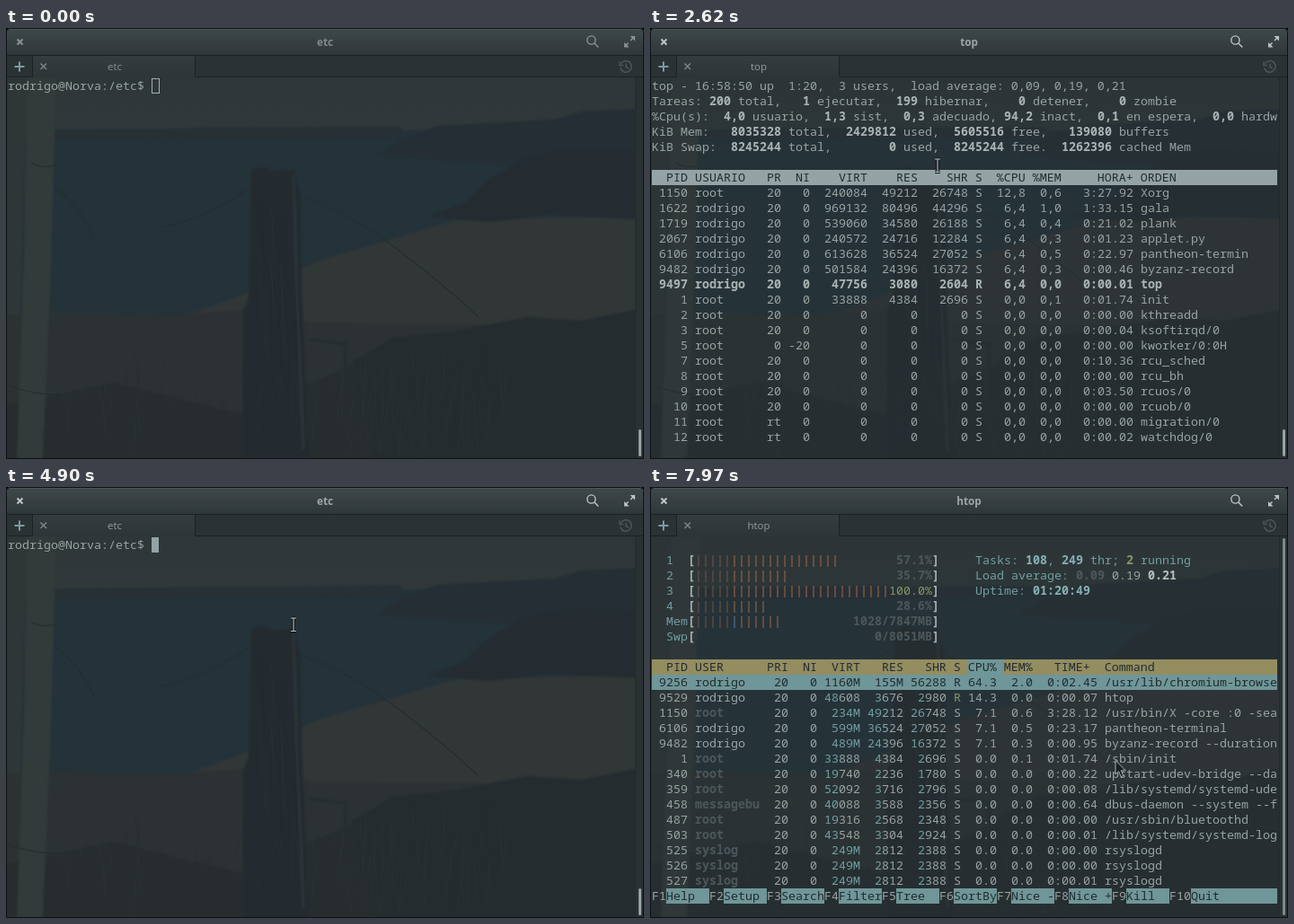
These frames come from a looping animation (710x480 px, 8000 ms). An HTML page with a canvas:

```html
<!DOCTYPE html>
<html lang="es">
<head>
<meta charset="utf-8">
<title>Terminal</title>
<style>
html, body { margin: 0; width: 100%; height: 100%; overflow: hidden; background: #000; }
canvas { display: block; width: 710px; height: 480px; }
</style>
</head>
<body>
<canvas id="stage" width="710" height="480"></canvas>
<script>
const W = 710, H = 480, LOOP = 8000;
const CW = 8, LH = 17, LEFT = 2, TOP = 56, LAST = 23;
const PROMPT = 'rodrigo@Norva:/etc$ ', USER = 'rodrigo';
const FG = '#98a3a2', BRIGHT = '#a9b4b4', DIM = '#4c575a', TEAL = '#6f9fa3',
      GREEN = '#87976a', DARK = '#222c30', OLIVE = '#938d60', CYAN = '#6f9698',
      BROWN = '#76584a', ORANGE = '#a26c49';
const MONO = '13.333px "Noto Sans Mono", "DejaVu Sans Mono", monospace';
const c = document.getElementById('stage').getContext('2d');

// time, screen, typed text, cursor, title
const steps = [
  [0, 'shell', '', 'box', 'etc'],
  [810, 'shell', '', 'block', 'etc'],
  [1340, 'shell', '', '', 'etc'],
  [1680, 'shell', 't', 'block', 'etc'],
  [1840, 'shell', 'to', 'block', 'etc'],
  [1930, 'shell', 'top', 'block', 'etc'],
  [2380, 'shell', 'top', '', 'etc'],
  [2420, 'shell', 'top', '', 'top'],
  [2620, 'top', '', '', 'top'],
  [3380, 'done', '', 'block', 'top'],
  [3420, 'done', '', 'block', 'etc: top'],
  [3950, 'done', '', '', 'etc: top'],
  [4160, 'done', 'c', 'block', 'etc: top'],
  [4265, 'done', 'cl', 'block', 'etc: top'],
  [4370, 'done', 'cle', 'block', 'etc: top'],
  [4570, 'done', 'clea', 'block', 'etc: top'],
  [4680, 'done', 'clear', 'block', 'etc: top'],
  [4900, 'shell', '', 'block', 'etc'],
  [5430, 'shell', '', '', 'etc'],
  [5590, 'shell', 'h', 'block', 'etc'],
  [5740, 'shell', 'ht', 'block', 'etc'],
  [5900, 'shell', 'hto', 'block', 'etc'],
  [6040, 'shell', 'htop', 'block', 'etc'],
  [6360, 'shell', 'htop', '', 'etc'],
  [6440, 'shell', 'htop', '', 'htop'],
  [6520, 'htop', '', '', 'htop']
];

// asterisks switch bold on and off
const topHead = [
  'top - 16:58:50 up  1:20,  3 users,  load average: 0,09, 0,19, 0,21',
  'Tareas: *200* total,   *1* ejecutar,  *199* hibernar,    *0* detener,    *0* zombie',
  '%Cpu(s):  *4,0* usuario,  *1,3* sist,  *0,3* adecuado, *94,2* inact,  *0,1* en espera,  *0,0* hardw',
  'KiB Mem:   *8035328* total,  *2429812* used,  *5605516* free,   *139080* buffers',
  'KiB Swap:  *8245244* total,        *0* used,  *8245244* free.  *1262396* cached Mem'
];
const topCols = '  PID USUARIO   PR  NI    VIRT    RES    SHR S  %CPU %MEM     HORA+ ORDEN';
const topRows = `1150 root 20 0 240084 49212 26748 S 12,8 0,6 3:27.92 Xorg
1622 @ 20 0 969132 80496 44296 S 6,4 1,0 1:33.15 gala
1719 @ 20 0 539060 34580 26188 S 6,4 0,4 0:21.02 plank
2067 @ 20 0 240572 24716 12284 S 6,4 0,3 0:01.23 applet.py
6106 @ 20 0 613628 36524 27052 S 6,4 0,5 0:22.97 pantheon-termin
9482 @ 20 0 501584 24396 16372 S 6,4 0,3 0:00.46 byzanz-record
9497 @ 20 0 47756 3080 2604 R 6,4 0,0 0:00.01 top
1 root 20 0 33888 4384 2696 S 0,0 0,1 0:01.74 init
2 root 20 0 0 0 0 S 0,0 0,0 0:00.00 kthreadd
3 root 20 0 0 0 0 S 0,0 0,0 0:00.04 ksoftirqd/0
5 root 0 -20 0 0 0 S 0,0 0,0 0:00.00 kworker/0:0H
7 root 20 0 0 0 0 S 0,0 0,0 0:10.36 rcu_sched
8 root 20 0 0 0 0 S 0,0 0,0 0:00.00 rcu_bh
9 root 20 0 0 0 0 S 0,0 0,0 0:03.50 rcuos/0
10 root 20 0 0 0 0 S 0,0 0,0 0:00.00 rcuob/0
11 root rt 0 0 0 0 S 0,0 0,0 0:00.00 migration/0
12 root rt 0 0 0 0 S 0,0 0,0 0:00.02 watchdog/0`.split('\n');
const topEnds = [5, 0, 18, 22, 30, 37, 44, 46, 52, 57, 67];

const htopCols = '  PID USER      PRI  NI  VIRT   RES   SHR S CPU% MEM%   TIME+  Command';
const htopRows = `9256 @ 20 0 1160M 155M 56288 R 64.3 2.0 0:02.45 /usr/lib/chromium-browse
9529 @ 20 0 48608 3676 2980 R 14.3 0.0 0:00.07 htop
1150 root 20 0 234M 49212 26748 S 7.1 0.6 3:28.12 /usr/bin/X -core :0 -sea
6106 @ 20 0 599M 36524 27052 S 7.1 0.5 0:23.17 pantheon-terminal
9482 @ 20 0 489M 24396 16372 S 7.1 0.3 0:00.95 byzanz-record --duration
1 root 20 0 33888 4384 2696 S 0.0 0.1 0:01.74 /sbin/init
340 root 20 0 19740 2236 1780 S 0.0 0.0 0:00.22 upstart-udev-bridge --da
359 root 20 0 52092 3716 2796 S 0.0 0.0 0:00.08 /lib/systemd/systemd-ude
458 messagebu 20 0 40088 3588 2356 S 0.0 0.0 0:00.64 dbus-daemon --system --f
487 root 20 0 19316 2568 2348 S 0.0 0.0 0:00.00 /usr/sbin/bluetoothd
503 root 20 0 43548 3304 2924 S 0.0 0.0 0:00.01 /lib/systemd/systemd-log
525 syslog 20 0 249M 2812 2388 S 0.0 0.0 0:00.00 rsyslogd
526 syslog 20 0 249M 2812 2388 S 0.0 0.0 0:00.00 rsyslogd
527 syslog 20 0 249M 2812 2388 S 0.0 0.0 0:00.01 rsyslogd`.split('\n');
const htopEnds = [5, 0, 19, 23, 29, 35, 41, 43, 48, 53, 62];

function put(row, col, text, color = FG, bold = false) {
  c.font = (bold ? 'bold ' : '') + MONO;
  c.fillStyle = color;
  c.fillText(text, LEFT + col * CW, TOP + row * LH + 13);
}
function band(row, col, cols, color) {
  c.fillStyle = color;
  c.fillRect(LEFT + col * CW, TOP + row * LH, cols * CW, LH);
}
function rich(row, col, text, color = FG, boldColor = BRIGHT) {
  text.split('*').forEach((part, i) => {
    put(row, col, part, i % 2 ? boldColor : color, i % 2 === 1);
    col += part.length;
  });
}
function poly(g, color, pts) {
  g.beginPath();
  for (let i = 0; i < pts.length; i += 2) g.lineTo(pts[i], pts[i + 1]);
  g.closePath();
  g.fillStyle = color;
  g.fill();
}
function line(g, color, width, path) {
  g.strokeStyle = color;
  g.lineWidth = width;
  g.stroke(new Path2D(path));
}
function fade(g, y0, y1, a, b) {
  const f = g.createLinearGradient(0, y0, 0, y1);
  f.addColorStop(0, a);
  f.addColorStop(1, b);
  return f;
}

// dim coastal landscape behind the text
function makeScene() {
  const cv = document.createElement('canvas');
  cv.width = W;
  cv.height = H;
  const g = cv.getContext('2d');
  let seed = 7;
  const rnd = () => (seed = seed * 16807 % 2147483647) / 2147483647;
  g.fillStyle = fade(g, 55, 115, '#2e3637', '#303839');
  g.fillRect(0, 0, W, H);
  g.filter = 'blur(1px)';
  g.fillStyle = fade(g, 112, 320, '#24323a', '#24333a');
  g.fillRect(0, 114, W, 210);
  poly(g, '#263035', [50, 114, 250, 111, 440, 110, 440, 122, 200, 124, 50, 125]);
  poly(g, '#252e34', [412, 142, 440, 124, 480, 109, 612, 102, 640, 93, 710, 90, 710, 150, 560, 152]);
  poly(g, '#313637', [205, 318, 250, 302, 350, 258, 500, 214, 710, 208, 710, 340, 205, 340]);
  poly(g, '#242c32', [470, 210, 510, 195, 535, 170, 575, 146, 620, 136, 710, 138, 710, 213, 600, 208, 540, 216]);
  poly(g, '#2c3233', [0, 314, 90, 318, 180, 320, 270, 314, 340, 328, 440, 330, 710, 330, 710, 480, 0, 480]);
  poly(g, '#272d2f', [0, 420, 120, 395, 260, 430, 420, 360, 420, 480, 0, 480]);
  poly(g, '#252c2f', [385, 372, 430, 345, 500, 338, 580, 322, 640, 326, 710, 312, 710, 480, 410, 480]);
  poly(g, '#2e3637', [0, 55, 24, 55, 16, 320, 0, 320]);
  poly(g, '#323a3a', [23, 55, 56, 55, 50, 270, 41, 480, 12, 480, 20, 250]);
  poly(g, '#242b30', [273, 158, 288, 155, 300, 160, 320, 158, 328, 188, 329, 290, 338, 480, 264, 480, 264, 316, 270, 300]);
  line(g, '#2d3537', 3, 'M320 164L324 300L331 470');
  line(g, '#252d30', 3, 'M338 347L378 352L377 390');
  g.filter = 'none';
  line(g, '#252d31', 1.3, 'M330 188Q380 204 435 246T526 322 M54 177Q84 200 98 234 M272 178Q225 210 174 222 M28 150Q42 158 56 152 M2 398Q45 414 90 405 M264 211L272 207');
  for (let i = 0; i < 120; i++) {
    const x = 45 + rnd() * 510, y = 400 + rnd() * 80, h = 12 + rnd() * 55, d = rnd() * 20 - 10;
    g.globalAlpha = 0.45;
    line(g, i % 3 ? '#31383a' : '#252c2f', 0.8, `M${x} ${y}Q${x + d / 3} ${y - h / 2} ${x + d} ${y - h}`);
  }
  for (let i = 0; i < 18; i++) {
    const x = 276 + rnd() * 52, y = 180 + rnd() * 180;
    line(g, i % 2 ? '#2d3538' : '#20282d', 1, `M${x} ${y}l3 ${40 + rnd() * 70}`);
  }
  return cv;
}
const scene = makeScene();

function drawChrome(title, focus) {
  const tone = (a, b) => {
    const v = Math.round(a + (b - a) * focus);
    return `rgb(${v},${v + 6},${v + 7})`;
  };
  c.fillStyle = fade(c, 0, 30, '#3f484a', '#2f3739');
  c.fillRect(0, 0, W, 30);
  c.fillStyle = '#4d5658';
  c.fillRect(4, 1, W - 8, 1);
  c.fillStyle = '#2b3234';
  c.fillRect(0, 30, W, 25);
  c.fillStyle = fade(c, 31, 55, '#343c3e', '#2d3537');
  c.fillRect(30, 31, 181, 24);
  c.fillStyle = '#1c2224';
  c.fillRect(0, 30, W, 1);
  c.fillRect(0, 54, 30, 1);
  c.fillRect(211, 54, W - 211, 1);
  c.fillRect(29, 31, 1, 23);
  c.fillRect(210, 31, 1, 23);

  c.textAlign = 'center';
  c.font = 'bold 11.7px "Open Sans", "Noto Sans", sans-serif';
  c.fillStyle = tone(132, 160);
  c.fillText(title, 355, 20);
  c.font = '11.5px "Open Sans", "Noto Sans", sans-serif';
  c.fillStyle = tone(138, 150);
  c.fillText(title, 121, 47);
  c.textAlign = 'left';

  const icon = tone(140, 190);
  line(c, icon, 2, 'M12.5 12.5l6 6m0 -6l-6 6');
  line(c, icon, 1.4, 'M656 13.5a4.6 4.6 0 1 1 -9.2 0a4.6 4.6 0 1 1 9.2 0M654.8 17l4.5 4.5');
  line(c, icon, 1.5, 'M695 14l4 -4M692.500 16.500l-4 4');
  poly(c, icon, [694.5, 9, 700, 9, 700, 14.5]);
  poly(c, icon, [688, 16, 688, 21.5, 693.5, 21.5]);
  line(c, '#7d9aa0', 2, 'M9.500 43h11M15 37.500v11');
  line(c, '#7f898b', 1.4, 'M38.500 39.500l6.500 6.500m0 -6.500l-6.500 6.500');
  line(c, '#4b5557', 1.5, 'M684.500 39.500a6.300 6.300 0 1 1 -0.800 5M683 37.500v4h4M690 39.500v4l3 1.500');
}

function drawFrame(full) {
  c.fillStyle = '#2a3133';
  c.fillRect(701, 55, 8, 424);
  c.fillStyle = '#232a2c';
  c.fillRect(700, 55, 1, 424);
  c.fillStyle = full ? '#7d898a' : '#98a4a4';
  c.beginPath();
  c.roundRect(704, full ? 57 : 447, 3, full ? 420 : 30, 1.5);
  c.fill();
  c.strokeStyle = '#0d1112';
  c.lineWidth = 1;
  c.beginPath();
  c.roundRect(0.5, 0.5, W - 1, H - 1, [4, 4, 0, 0]);
  c.stroke();
}

function drawPrompt(row, typed, cursor) {
  put(row, 0, PROMPT + typed);
  const x = LEFT + (PROMPT.length + typed.length) * CW, y = TOP + row * LH;
  if (cursor === 'block') band(row, PROMPT.length + typed.length, 1, '#94a3a5');
  if (cursor === 'box') {
    c.strokeStyle = '#a4b0b1';
    c.lineWidth = 1;
    c.strokeRect(x + 0.5, y + 0.5, CW, LH - 1);
  }
}

function cells(text) {
  const parts = text.replace('@', USER).split(' ');
  return [...parts.slice(0, 11), parts.slice(11).join(' ')];
}

function drawTop(shift) {
  topHead.forEach((text, i) => { if (i >= shift) rich(i - shift, 0, text); });
  band(6 - shift, 0, 87, '#94a3a5');
  put(6 - shift, 0, topCols, DARK);
  topRows.forEach((text, i) => {
    const row = 7 + i - shift, bold = i === 6, color = bold ? BRIGHT : FG;
    cells(text).forEach((v, k) => {
      const col = k === 1 ? 6 : k === 11 ? 68 : topEnds[k] - v.length;
      put(row, col, v, color, bold);
    });
  });
}

function drawMeter(row, label, bars, value, blue) {
  put(row, 2, label, TEAL);
  put(row, 5, '[', BRIGHT, true);
  for (let i = 0; i < bars; i++) {
    put(row, 6 + i, '|', i === blue ? '#5b83ad' : i < 5 ? BROWN : ORANGE);
  }
  const whole = value === '100.0%';
  put(row, 39 - value.length, value, whole ? GREEN : DIM, !whole);
  put(row, 39, ']', BRIGHT, true);
}

function drawSize(row, end, v) {
  const col = end - v.length, cut = v.endsWith('M') ? v.length : Math.max(0, v.length - 3);
  put(row, col, v.slice(0, cut), TEAL);
  put(row, col + cut, v.slice(cut));
}

function drawHtop() {
  drawMeter(1, '1', 20, '57.1%');
  drawMeter(2, '2', 13, '35.7%');
  drawMeter(3, '3', 27, '100.0%');
  drawMeter(4, '4', 10, '28.6%');
  drawMeter(5, 'Mem', 12, '1028/7847MB', 5);
  drawMeter(6, 'Swp', 0, '0/8051MB');
  rich(1, 45, 'Tasks: *108*, *249* thr; ', TEAL, '#86b0b3');
  put(1, 66, '2', GREEN, true);
  put(1, 68, 'running', TEAL);
  put(2, 45, 'Load average:', TEAL);
  put(2, 59, '0.09', DIM, true);
  put(2, 64, '0.19');
  put(2, 69, '0.21', '#b5bfbf', true);
  rich(3, 45, 'Uptime: *01:20:49*', TEAL, '#86b0b3');

  band(8, 0, 87, OLIVE);
  band(8, 44, 5, CYAN);
  put(8, 0, htopCols, DARK);
  htopRows.forEach((text, i) => {
    const row = 9 + i, picked = i === 0;
    if (picked) band(row, 0, 87, CYAN);
    cells(text).forEach((v, k) => {
      const col = k === 1 ? 6 : k === 11 ? 63 : htopEnds[k] - v.length;
      if (picked) put(row, col, v, DARK);
      else if (k >= 4 && k <= 6) drawSize(row, htopEnds[k], v);
      else if (k === 1 && v !== USER) put(row, col, v, DIM, true);
      else put(row, col, v, k === 7 && v === 'R' ? GREEN : FG);
    });
  });
  'Help,Setup,Search,Filter,Tree,SortBy,Nice -,Nice +,Kill,Quit'.split(',').forEach((name, i) => {
    const key = 'F' + (i + 1), col = i * 8 + key.length;
    put(LAST, i * 8, key);
    band(LAST, col, i === 9 ? 87 - col : 6, CYAN);
    put(LAST, col, name, DARK);
  });
}

function drawBeam(x, y) {
  const path = `M${x - 3} ${y - 7}h2.500l.5 .5l.5 -.5h2.500M${x} ${y - 6.5}v14M${x - 3} ${y + 7.5}h6`;
  line(c, '#0c1011', 3.2, path);
  line(c, '#c3caca', 1.1, path);
}
function drawArrow(x, y) {
  const path = new Path2D(`M${x} ${y}v15.500l3.600 -3.200l2.600 5.900l2.700 -1.200l-2.600 -5.700h5z`);
  c.fillStyle = '#1b2022';
  c.fill(path);
  c.strokeStyle = '#a9b2b3';
  c.lineWidth = 1;
  c.stroke(path);
}

const smooth = p => p * p * (3 - 2 * p);
// pointer positions are sampled every 40 ms
const travel = (t, start, count) =>
  smooth(Math.max(0, Math.min(1, (Math.floor((t - start) / 40) + 1) / count)));

function drawPointer(t) {
  if (t < 440) return;
  if (t < 6600) {
    const e = smooth(Math.min(1, Math.floor((t - 440) / 40) / 3));
    drawBeam(Math.round(642 - 322 * e) , Math.round(156 - 3 * e));
  } else {
    const e = travel(t, 7410, 15);
    drawArrow(318 + 200 * e, 152.5 + 152 * e);
  }
}

function draw(t) {
  const [, screen, typed, cursor, title] = steps.filter(s => s[0] <= t).pop();
  const focus = t < 810 ? 0 : t < 860 ? 1 / 3 : t < 910 ? 2 / 3 : 1;
  c.clearRect(0, 0, W, H);
  c.save();
  c.beginPath();
  c.roundRect(0, 0, W, H, [5, 5, 0, 0]);
  c.clip();
  c.drawImage(scene, 0, 0);
  if (screen !== 'shell') {
    c.fillStyle = 'rgba(42,51,54,.35)';
    c.fillRect(0, 55, W, H - 55);
  }
  drawChrome(title, focus);
  if (screen === 'shell') drawPrompt(0, typed, cursor);
  if (screen === 'top') drawTop(0);
  if (screen === 'done') {
    drawTop(1);
    drawPrompt(LAST, typed, cursor);
  }
  if (screen === 'htop') drawHtop();
  drawFrame(screen === 'htop');
  drawPointer(t);
  c.restore();
}

const start = performance.now();
function tick() {
  draw((performance.now() - start) % LOOP);
  requestAnimationFrame(tick);
}
tick();
</script>
</body>
</html>
```
